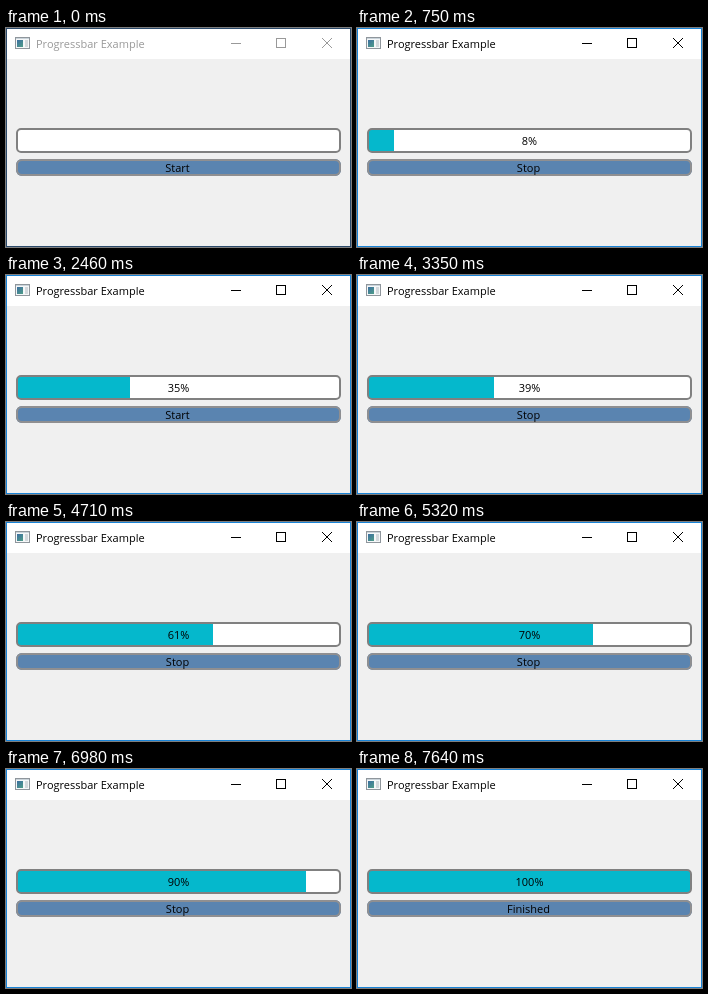
An HTML page with a canvas for the animation above (7950 ms loop, 345 by 219 pixels).

```html
<!DOCTYPE html>
<html lang="en">
<head>
<meta charset="utf-8">
<title>Progressbar Example</title>
<style>
  html, body { margin: 0; width: 100%; height: 100%; overflow: hidden; background: #f0f0f0; }
  canvas { display: block; }
</style>
</head>
<body>
<canvas id="stage" width="345" height="219"></canvas>
<script>
const ctx = document.getElementById('stage').getContext('2d');
const LOOP = 7950;
const ACTIVATED = 160;
const FONT = '11px "Open Sans", "Noto Sans", sans-serif';

// [ms, percent]: the counter runs linearly between these and shows whole numbers
const PROGRESS = [
  [290, 1], [920, 11], [1730, 24], [1800, 25], [2435, 35],
  [3160, 36], [3350, 39], [3430, 40], [3790, 46], [3840, 47],
  [4580, 59], [4660, 60], [4710, 61], [4780, 62], [5410, 72],
  [5950, 73], [6550, 83], [6630, 84], [6980, 90], [7030, 91],
  [7360, 96], [7430, 97], [7590, 100]
];

// [ms, label, pressed]
const BUTTON = [
  [0, 'Start', false], [ACTIVATED, 'Start', true], [230, 'Stop', false],
  [2370, 'Stop', true], [2460, 'Start', false],
  [3020, 'Start', true], [3095, 'Stop', false],
  [5340, 'Stop', true], [5430, 'Start', false],
  [5790, 'Start', true], [5890, 'Stop', false],
  [7640, 'Finished', false]
];

function percentAt(t) {
  if (t < PROGRESS[0][0]) return 0;
  const next = PROGRESS.findIndex(([time]) => time > t);
  if (next < 0) return 100;
  const [t0, p0] = PROGRESS[next - 1];
  const [t1, p1] = PROGRESS[next];
  return Math.floor(p0 + (p1 - p0) * (t - t0) / (t1 - t0) + 1e-6);
}

function rect(x, y, w, h, color) {
  ctx.fillStyle = color;
  ctx.fillRect(x, y, w, h);
}

function text(str, x, y, color, align) {
  ctx.font = FONT;
  ctx.textAlign = align;
  ctx.fillStyle = color;
  ctx.fillText(str, x, y);
}

function frame(x, y, w, h, radius, border, paintInside) {
  ctx.save();
  ctx.beginPath();
  ctx.roundRect(x, y, w, h, radius);
  ctx.clip();
  paintInside();
  ctx.restore();
  ctx.beginPath();
  ctx.roundRect(x + 1, y + 1, w - 2, h - 2, radius - 1);
  ctx.lineWidth = 2;
  ctx.strokeStyle = border;
  ctx.stroke();
}

function appIcon() {
  rect(9, 9, 15, 12, '#8f969c');
  rect(10, 10, 13, 1, '#c9d3da');
  rect(10, 11, 13, 9, '#f5f7f8');
  const panel = ctx.createLinearGradient(11, 12, 17, 19);
  panel.addColorStop(0, '#3b6ea0');
  panel.addColorStop(1, '#4f9d88');
  rect(11, 12, 6, 7, panel);
  rect(19, 12, 3, 7, '#d3d8dc');
}

function titleBar(active) {
  const ink = active ? '#000' : '#999';
  rect(1, 1, 343, 30, '#fff');
  appIcon();
  text('Progressbar Example', 30, 20, ink, 'left');

  rect(225, 15, 10, 1, ink);
  ctx.strokeStyle = ink;
  ctx.lineWidth = 1;
  ctx.strokeRect(270.5, 10.5, 9, 9);
  ctx.beginPath();
  ctx.moveTo(316, 10);
  ctx.lineTo(326, 20);
  ctx.moveTo(326, 10);
  ctx.lineTo(316, 20);
  ctx.stroke();
}

function progressBar(percent) {
  frame(10, 100, 325, 25, 5, '#808080', () => {
    rect(10, 100, 325, 25, '#fff');
    if (percent) rect(12, 102, Math.floor(3.21 * percent), 21, '#05b8cc');
  });
  if (percent) text(percent + '%', 172.5, 117, '#000', 'center');
}

function button(label, pressed) {
  let fill = '#5a84b0';
  if (pressed) {
    fill = ctx.createLinearGradient(0, 131, 0, 148);
    fill.addColorStop(0, '#dadbde');
    fill.addColorStop(1, '#f6f7fa');
  }
  frame(10, 131, 325, 17, 6, '#8f8f91', () => rect(10, 131, 325, 17, fill));
  text(label, 171.5, 144, '#000', 'center');
}

function draw(t) {
  const active = t >= ACTIVATED;
  const [, label, pressed] = BUTTON.findLast(([time]) => time <= t);
  rect(0, 0, 345, 219, active ? '#1883d7' : '#2b4a6b');
  rect(1, 1, 343, 217, '#f0f0f0');
  titleBar(active);
  progressBar(percentAt(t));
  button(label, pressed);
}

const start = performance.now();
function tick() {
  draw((performance.now() - start) % LOOP);
  requestAnimationFrame(tick);
}
tick();
</script>
</body>
</html>
```
